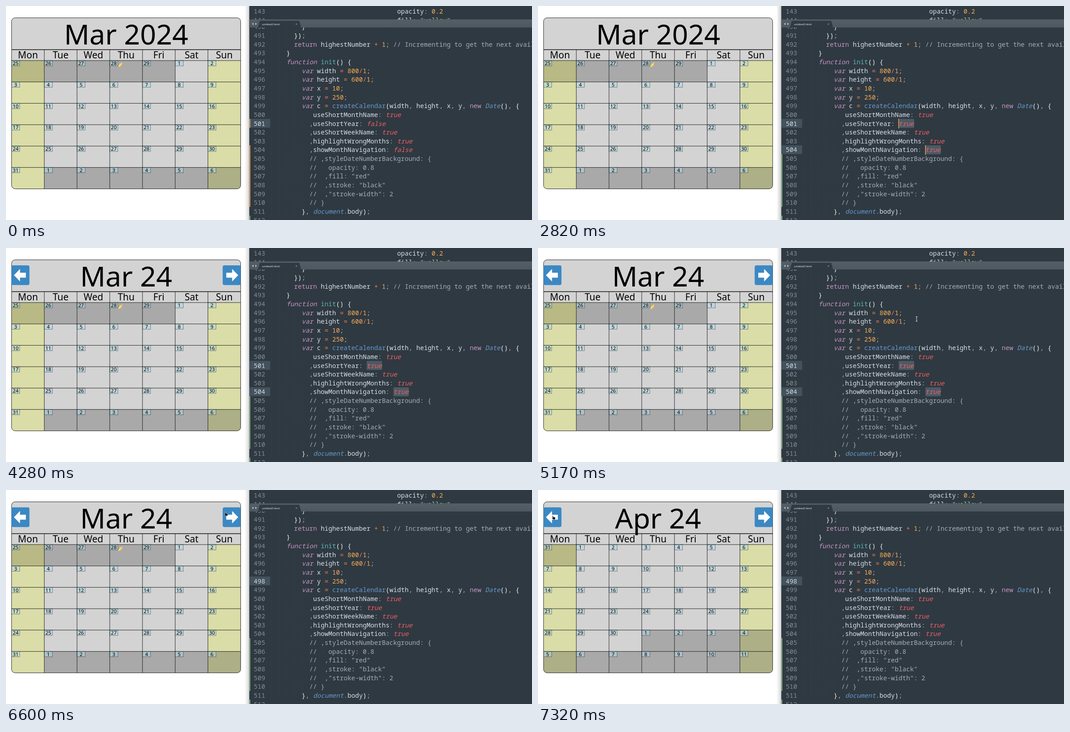
An HTML page with a canvas for the animation above (8 s loop, 1171 by 478 pixels).

```html
<!DOCTYPE html>
<html lang="en">
<head>
<meta charset="utf-8">
<title>Calendar options</title>
<style>
html, body { margin: 0; width: 100%; height: 100%; overflow: hidden; background: #fff; }
canvas { display: block; }
</style>
</head>
<body>
<canvas id="stage" width="1171" height="478"></canvas>
<script>
const ctx = document.getElementById('stage').getContext('2d');
const LOOP = 8000, W = 1171, H = 478;
const SANS = '"Noto Sans", "Open Sans", sans-serif';
const MONO = '"Noto Sans Mono", "DejaVu Sans Mono", monospace';

function rect(x, y, w, h, color) {
  ctx.fillStyle = color;
  ctx.fillRect(x, y, w, h);
}

function text(str, x, y, font, color, align = 'left') {
  ctx.font = font;
  ctx.fillStyle = color;
  ctx.textAlign = align;
  ctx.fillText(str, x, y);
}

function shape(points, fill, stroke, width = 1) {
  ctx.beginPath();
  points.forEach(([x, y]) => ctx.lineTo(x, y));
  ctx.closePath();
  if (stroke) {
    ctx.strokeStyle = stroke;
    ctx.lineWidth = width;
    ctx.stroke();
  }
  ctx.fillStyle = fill;
  ctx.fill();
}

function line(x1, y1, x2, y2, width) {
  ctx.lineWidth = width;
  ctx.beginPath();
  ctx.moveTo(x1, y1);
  ctx.lineTo(x2, y2);
  ctx.stroke();
}

// ---------- calendar ----------
const CAL = { x: 12.4, y: 26.4, w: 510, h: 382, head: 97.5, days: 121.9 };
const COL = CAL.w / 7, ROW = (CAL.y + CAL.h - CAL.days) / 6;
const MONTHS = {
  Mar: { lead: 5, prev: 29, len: 31 },
  Apr: { lead: 1, prev: 31, len: 30 }
};

function dayCell(i, { lead, prev, len }) {
  const c = i % 7, x = CAL.x + c * COL, y = CAL.days + Math.floor(i / 7) * ROW;
  const n = i - lead, weekend = c === 0 || c === 6;
  let label = n + 1, color = weekend ? '#dadda7' : '#d3d3d3';
  if (n < 0) {
    label += prev;
    color = weekend ? '#b8b985' : '#a9a9a9';
  } else if (n >= len) {
    label -= len;
    color = weekend ? '#adaf86' : '#a9a9a9';
  }
  rect(x, y, COL + 0.5, ROW + 0.5, color);
  rect(x, y, 18, 12, 'rgba(173,216,230,.55)');
  ctx.strokeStyle = 'rgba(0,0,0,.6)';
  ctx.lineWidth = 0.7;
  ctx.strokeRect(x, y, 18, 12);
  text(label, x + 9, y + 10.3, '11.2px ' + SANS, '#000', 'center');
}

function todayMark() {
  shape([[250, 135], [252, 130], [255, 128], [259, 125], [259, 129], [257, 134], [253, 136]], '#f2c14e');
  shape([[250, 135.5], [256, 128], [257, 129], [251, 136]], '#fff0b5');
}

function navButton(x, dir) {
  ctx.fillStyle = '#3b88c3';
  ctx.beginPath();
  ctx.roundRect(x, 38.7, 40, 44, 4);
  ctx.fill();
  const cx = x + 20;
  const p = [[14.5, 0], [1, -14], [1, -5.5], [-12, -5.5], [-12, 5.5], [1, 5.5], [1, 14]];
  shape(p.map(([a, b]) => [cx + a * dir, 60.8 + b]), '#fff');
}

function calendar(month, year, nav) {
  const { x, y, w, h, head, days } = CAL;
  ctx.save();
  ctx.beginPath();
  ctx.roundRect(x, y, w, h, 8);
  ctx.clip();
  rect(x, y, w, h, '#d3d3d3');
  for (let i = 0; i < 42; i++) dayCell(i, MONTHS[month]);
  ctx.strokeStyle = '#111';
  for (let c = 1; c < 7; c++) line(x + c * COL, head, x + c * COL, y + h, 0.9);
  for (let r = 0; r < 6; r++) line(x, days + r * ROW, x + w, days + r * ROW, 0.9);
  line(x, head, x + w, head, 1.5);
  ctx.restore();

  ctx.strokeStyle = '#111';
  ctx.lineWidth = 0.9;
  ctx.beginPath();
  ctx.roundRect(x, y, w, h, 8);
  ctx.stroke();
  ['Mon', 'Tue', 'Wed', 'Thu', 'Fri', 'Sat', 'Sun'].forEach((d, c) =>
    text(d, x + (c + 0.5) * COL, 117.3, '20.9px ' + SANS, '#000', 'center'));
  text(month + ' ' + year, x + w / 2, 85.6, '62.4px ' + SANS, '#000', 'center');
  if (month === 'Mar') todayMark();
  if (nav) {
    navButton(x - 0.2, -1);
    navButton(x + w - 40, 1);
  }
}

// ---------- editor ----------
const ED = 541.5, CH = 8.505, BASE = 590.2, LH = 19.65, FIRST = 490;
const FONT = CH / 0.6 + 'px ' + MONO;
const BG = '#2f3941', FG = '#d8dee9', DIM = '#a6acb9';
const RULES = [
  [/^\/\/.*/, DIM],
  [/^"[^"]*"/, '#99c794'],
  [/^(var|function)\b/, '#c695c6', true],
  [/^(return|new)\b/, '#c695c6'],
  [/^(true|false)\b/, '#ec5f66', true],
  [/^(Date|document)\b/, '#6699cc', true],
  [/^createCalendar/, '#6699cc'],
  [/^init\b/, '#5fb4b4'],
  [/^\d+(\.\d+)?/, '#f9ae58'],
  [/^[=+\/]/, '#f97b58'],
  [/^[;:,.]/, DIM],
  [/^[a-zA-Z]+/, FG],
  [/^[(){}]+/, '#eef1f5']
];

const codeX = col => BASE + col * CH;
const rowY = n => 71 + (n - FIRST - 1) * LH;

function code(src, col, y) {
  while (src) {
    const rule = RULES.find(r => r[0].test(src));
    const word = rule ? src.match(rule[0])[0] : src[0];
    if (rule) text(word, codeX(col), y, (rule[2] ? 'italic ' : '') + FONT, rule[1]);
    col += word.length;
    src = src.slice(word.length);
  }
}

function listing(year, nav) {
  return [
    [8, '}'],
    [6, '});'],
    [6, 'return highestNumber + 1; // Incrementing to get the next available'],
    [4, '}'],
    [4, 'function init() {'],
    [8, 'var width = 800/1;'],
    [8, 'var height = 600/1;'],
    [8, 'var x = 10;'],
    [8, 'var y = 250;'],
    [8, 'var c = createCalendar(width, height, x, y, new Date(), {'],
    [10, ' useShortMonthName: true'],
    [10, ',useShortYear: ' + year],
    [10, ',useShortWeekName: true'],
    [10, ',highlightWrongMonths: true'],
    [10, ',showMonthNavigation: ' + nav],
    [10, '// ,styleDateNumberBackground: {'],
    [10, '//   opacity: 0.8'],
    [10, '//  ,fill: "red"'],
    [10, '//  ,stroke: "black"'],
    [10, '//  ,"stroke-width": 2'],
    [10, '// }'],
    [8, '}, document.body);'],
    [0, '']
  ];
}

function guides(n) {
  const depth = n >= 500 && n <= 510 ? 5 : n >= 495 && n <= 511 ? 4 : n === 494 || n === 493 ? 2 : 3;
  for (let g = 0; g < depth; g++)
    for (let y = 0; y < LH; y += 3) rect(Math.round(codeX(g * 2)), rowY(n) - 15 + y, 0.8, 1.2, '#3b454e');
}

function marks(from, to, color) {
  rect(542, rowY(from) - 15.3, 2, (to - from + 1) * LH, color);
}

function caret(col, n) {
  rect(codeX(col) - 0.5, rowY(n) - 15.5, 1.4, 21.5, '#f9ae58');
}

function selection(col, n) {
  ctx.fillStyle = '#4c5a65';
  ctx.beginPath();
  ctx.roundRect(codeX(col), rowY(n) - 15.3, 4 * CH + 0.5, LH + 0.5, 2);
  ctx.fill();
}

function bracket(col, n) {
  rect(codeX(col) + 0.5, rowY(n) + 4.6, CH - 1, 1, '#9aa3ac');
}

function tabBar(dirty) {
  const g = ctx.createLinearGradient(0, 30, 0, 48);
  g.addColorStop(0, '#545e66');
  g.addColorStop(1, '#4e5860');
  rect(ED, 30, W, 18, g);
  shape([[561, 48], [565, 33], [653, 33], [657, 48]], '#303a42');
  shape([[547.5, 40], [551, 37.5], [551, 42.5]], '#c3c9ce');
  shape([[558.5, 40], [555, 37.5], [555, 42.5]], '#c3c9ce');
  text('untitled3.html', 570, 42.6, '5.9px ' + SANS, '#eef1f4');
  text(dirty ? '●' : '×', 646.5, 42.6, '7px ' + SANS, '#b9c0c7', 'center');
}

function editor(s) {
  const g = ctx.createLinearGradient(531, 0, ED, 0);
  g.addColorStop(0, 'rgba(0,0,0,0)');
  g.addColorStop(1, s.focus ? 'rgba(0,0,0,.2)' : 'rgba(0,0,0,.16)');
  rect(531, 0, ED - 531, H, g);
  rect(ED, 0, W - ED, H, BG);

  [143, 144].forEach((n, i) => text(n, 551.5, 17 + i * LH, FONT, '#848b94'));
  code('opacity: 0.2', 33, 17);
  code('fill: "yellow"', 33, 17 + LH);

  listing(s.edited, s.edited).forEach(([col, src], i) => {
    const n = FIRST + i, active = s.rows.includes(n);
    if (active) rect(542, rowY(n) - 15.3, 46, LH, '#44525e');
    if (n < 512) guides(n);
    if (s.selected && n === 501) selection(25, n);
    if (s.selected && n === 504) selection(32, n);
    text(n, 551.5, rowY(n), FONT, active ? '#d5dae0' : '#848b94');
    code(src, col, rowY(n));
  });

  if (s.saved) marks(505, 510, '#77ad79');
  else {
    marks(501, 501, '#e39a4f');
    marks(504, 510, '#e39a4f');
  }
  marks(512, 512, '#77ad79');
  s.brackets.forEach(b => bracket(...b));
  s.carets.forEach(c => caret(...c));
  tabBar(s.dirty);
}

// ---------- pointer ----------
// start, end, number of positions, from, to, time when it disappears
const MOVES = [
  [940, 1430, 7, [493, 44], [892, 263.5], 2000],
  [2890, 3370, 7, [885, 258], [287, 62], 4280],
  [4690, 5390, 10, [451, 60], [980, 193], 5630],
  [5880, 6200, 5, [973, 191], [488, 49], 6680],
  [6680, 7010, 5, [470, 50], [7, 64], 7170],
  [7170, 7320, 3, [18, 62], [33, 57], LOOP]
];

function pointerAt(t) {
  const move = MOVES.find(m => t >= m[0] && t < m[5]);
  if (!move) return null;
  const [t0, t1, n, a, b] = move;
  const k = Math.min(1, Math.floor((t - t0) / (t1 - t0) * (n - 1) + 0.001) / (n - 1));
  const e = k * k * (3 - 2 * k);
  return a.map((v, i) => v + (b[i] - v) * e);
}

function pointer([x, y], nav) {
  const onButton = nav && y > 39 && y < 83 && (x > 12 && x < 52 || x > 482 && x < 522);
  const put = pts => pts.map(([a, b]) => [x + a, y + b]);
  if (x > ED) {
    ctx.strokeStyle = '#e6e9ec';
    line(x, y - 5, x, y + 5, 1);
    line(x - 2, y - 5, x + 2, y - 5, 1);
    line(x - 2, y + 5, x + 2, y + 5, 1);
  } else if (onButton) {
    shape(put([[-1, 1], [0, 0.5], [1.2, 3.6], [4.5, 4], [5.5, 5], [5, 8.5], [0.5, 8.5], [-2, 5.5], [0, 5]]),
      '#111', 'rgba(255,255,255,.75)', 1.2);
  } else {
    shape(put([[0.5, 0.5], [0.5, 10], [2.7, 8], [4.2, 11.4], [5.7, 10.7], [4.2, 7.4], [7.3, 7.2]]),
      '#111', '#fff', 1.2);
  }
}

// ---------- timeline ----------
function stateAt(t) {
  const s = {
    focus: t >= 1660 && t < 3620 || t >= 5470 && t < 6520,
    edited: t >= 2160,
    dirty: t >= 2160 && t < 2820,
    saved: t >= 2820,
    selected: t >= 2160 && t < 5470,
    rows: t < 2160 ? [501] : t < 5470 ? [501, 504] : [498],
    brackets: [],
    carets: []
  };
  if (!s.focus) return s;
  if (t < 2160) {
    s.carets = [[30, 501]];
    s.brackets = [[64, 499], [8, 511]];
  } else if (t < 5470) {
    s.carets = [[25, 501], [32, 504]];
  } else {
    s.carets = [[20, 498]];
    s.brackets = [[20, 494]];
  }
  return s;
}

function draw(t) {
  const nav = t >= 4280, p = pointerAt(t);
  rect(0, 0, W, H, '#fff');
  calendar(t < 6680 ? 'Mar' : 'Apr', nav ? '24' : '2024', nav);
  editor(stateAt(t));
  if (p) pointer(p, nav);
}

const start = performance.now();
function tick() {
  draw((performance.now() - start) % LOOP);
  requestAnimationFrame(tick);
}
tick();
</script>
</body>
</html>
```
